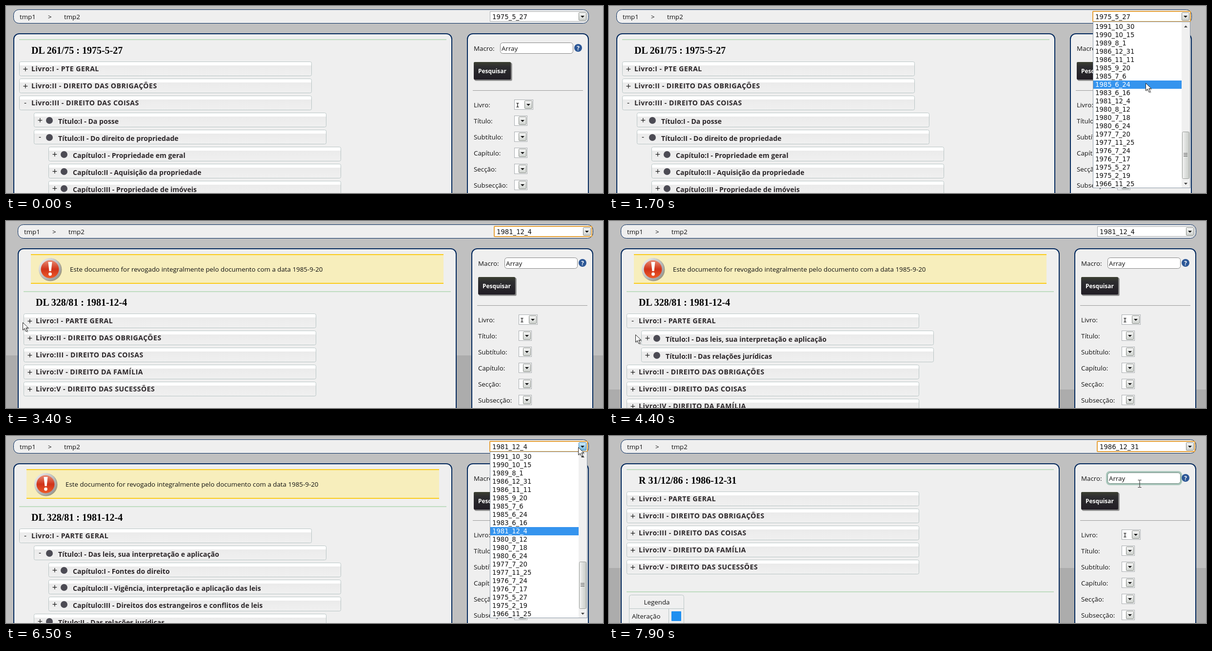
An HTML page for the animation above (8 s loop, 1224 px wide and 384 px high).

```html
<!DOCTYPE html>
<html lang="pt">
<head>
<meta charset="utf-8">
<style>
html, body { margin: 0; width: 100%; height: 100%; overflow: hidden; background: #c0c0c0; }
svg { display: block; }
text { font: 13.35px "Open Sans", "Noto Sans", sans-serif; fill: #111; white-space: pre; }
.date { font: 13.2px "DejaVu Sans", sans-serif; }
.mono { font: 13px "DejaVu Sans Mono", monospace; }
.sign { font: 14px "DejaVu Sans", sans-serif; }
.row { font-weight: 700; font-size: 14.1px; fill: #2b2629; }
.top { letter-spacing: .5px; }
.title { font: 700 20px "Liberation Serif", serif; fill: #000; }
.btn { font-weight: 700; font-size: 11.9px; fill: #fff; }
</style>
</head>
<body>
<svg width="1224" height="384">
  <defs>
    <linearGradient id="row" x2="0" y2="1">
      <stop offset=".25" stop-color="#fff"/><stop offset=".27" stop-color="#ebebeb"/><stop offset="1" stop-color="#f0f0f0"/>
    </linearGradient>
    <linearGradient id="grey" x2="0" y2="1">
      <stop offset="0" stop-color="#f6f6f6"/><stop offset="1" stop-color="#cfd3cf"/>
    </linearGradient>
    <linearGradient id="hot" x2="0" y2="1">
      <stop offset="0" stop-color="#d5effc"/><stop offset="1" stop-color="#6cb3dc"/>
    </linearGradient>
    <linearGradient id="thumb">
      <stop offset="0" stop-color="#f5f5f5"/><stop offset=".5" stop-color="#dcdedc"/><stop offset="1" stop-color="#c8ccc8"/>
    </linearGradient>
    <linearGradient id="dark" x2="0" y2="1">
      <stop offset="0" stop-color="#3c4032"/><stop offset=".25" stop-color="#2e2e30"/><stop offset="1" stop-color="#211d25"/>
    </linearGradient>
    <linearGradient id="ring" x2="1" y2="1">
      <stop offset="0" stop-color="#f4f4f4"/><stop offset="1" stop-color="#8c8c8c"/>
    </linearGradient>
    <linearGradient id="red" x2="0" y2="1">
      <stop offset="0" stop-color="#e88a72"/><stop offset=".5" stop-color="#d0331a"/><stop offset="1" stop-color="#ee5a28"/>
    </linearGradient>
  </defs>
  <g id="stage"></g>
</svg>
<script>
const LOOP = 8000, NAVY = '#02285c', LINE = '#b9c5c5', GREEN = '#bfdcc0';
const dates = ('1991_10_30 1990_10_15 1989_8_1 1986_12_31 1986_11_11 1985_9_20 1985_7_6 1985_6_24 1983_6_16 1981_12_4 ' +
  '1980_8_12 1980_7_18 1980_6_24 1977_7_20 1977_11_25 1976_7_24 1976_7_17 1975_5_27 1975_2_19 1966_11_25').split(' ');

// Each row: indent level, sign, label
const books = ['I - PARTE GERAL', 'II - DIREITO DAS OBRIGAÇÕES', 'III - DIREITO DAS COISAS',
  'IV - DIREITO DA FAMÍLIA', 'V - DIREITO DAS SUCESSÕES'].map(s => [0, '+', 'Livro:' + s]);
const chapters = [
  [2, '+', 'Capítulo:I - Fontes do direito'],
  [2, '+', 'Capítulo:II - Vigência, interpretação e aplicação das leis'],
  [2, '+', 'Capítulo:III - Direitos dos estrangeiros e conflitos de leis']];
const expanded = (sign, inner) => [
  [0, '-', books[0][2]],
  [1, sign, 'Título:I - Das leis, sua interpretação e aplicação'],
  ...inner,
  [1, '+', 'Título:II - Das relações jurídicas'],
  ...books.slice(1)];
const revoked = { title: 'DL 328/81 : 1981-12-4', notice: true };

// Page states by start time; floor is where the darker backdrop begins
const pages = [
  { at: 0, title: 'DL 261/75 : 1975-5-27', rows: [
    [0, '+', 'Livro:I - PTE GERAL'], books[1], [0, '-', books[2][2]],
    [1, '+', 'Título:I - Da posse'],
    [1, '-', 'Título:II - Do direito de propriedade'],
    [2, '+', 'Capítulo:I - Propriedade em geral'],
    [2, '+', 'Capítulo:II - Aquisição da propriedade'],
    [2, '+', 'Capítulo:III - Propriedade de imóveis']] },
  { at: 3000, ...revoked, rows: books, shift: 9, floor: 276 },
  { at: 3800, ...revoked, rows: expanded('+', []), shift: 9, floor: 346 },
  { at: 5200, ...revoked, rows: expanded('-', chapters) },
  { at: 7700, title: 'R 31/12/86 : 1986-12-31', rows: books, shift: 9, floor: 271, legend: true }];

// Pointer path: time, x, y
const path = [[300, 1212, 150], [700, 1182, 22], [1100, 1182, 22], [1200, 1166, 34], [2000, 1060, 232],
  [2500, 1043, 198], [3000, 1043, 198], [3400, 34, 208], [3700, 46, 204], [3800, 46, 204],
  [4600, 57, 243], [4900, 75, 234], [5200, 75, 234], [5500, 99, 238], [6000, 84, 240],
  [6400, 1180, 22], [6500, 1173, 23], [6900, 1095, 70], [7100, 1088, 98], [LOOP, 1088, 98]];

const rect = (x, y, w, h, fill, stroke, rx = 0, sw = 1) =>
  `<rect x="${x}" y="${y}" width="${w}" height="${h}" fill="${fill}" rx="${rx}"` +
  (stroke ? ` stroke="${stroke}" stroke-width="${sw}"/>` : '/>');
const text = (x, mid, s, cls = '', extra = '') =>
  `<text x="${x}" y="${mid + 5}" class="${cls}" ${extra}>${s}</text>`;
const dot = (x, y, r, fill) => `<circle cx="${x}" cy="${y}" r="${r}" fill="${fill}"/>`;
const shape = (d, fill, stroke = 'none') => `<path d="${d}" fill="${fill}" stroke="${stroke}"/>`;

function pointerAt(t) {
  const i = path.findIndex(k => k[0] > t);
  if (i < 1) return null;
  const [t0, x0, y0] = path[i - 1], [t1, x1, y1] = path[i], p = (t - t0) / (t1 - t0);
  return [x0 + (x1 - x0) * p, y0 + (y1 - y0) * p];
}

function select(x, y, w, hot) {
  const b = x + w - 18;
  return rect(x + .5, y + .5, w - 1, 20, '#fff', '#a9adb0') +
    rect(b + .5, y + 2.5, 15, 16, hot ? 'url(#hot)' : 'url(#grey)', hot ? '#3c7fb1' : '#858a85', 1) +
    shape(`M${b + 4} ${y + 9}h8l-4 4z`, '#111');
}

function row([level, sign, label], y) {
  const x = 27 + 30 * level;
  return rect(x + .5, y + .5, 599, 29, 'url(#row)', LINE, 3) +
    text(sign == '+' ? x + 7 : x + 10, y + 15, sign, 'sign') +
    (level ? dot(x + 32, y + 16, 7, '#4c4b54') + text(x + 50, y + 18, label, 'row')
           : text(x + 25, y + 15, label, 'row top'));
}

const notice = () =>
  rect(42, 68, 846, 61, '#f7eebc') + rect(42, 68, 846, 2, '#fbcb1a') + rect(42, 127, 846, 2, '#fbcb1a') +
  dot(82, 100, 23.5, '#9f9a80') + dot(81, 99, 23, 'url(#ring)') + dot(81, 99, 18.5, 'url(#red)') +
  shape('M77.5 84h8l-2 19h-4z', '#fff') + dot(81.5, 109, 3.4, '#fff') +
  text(122, 99, 'Este documento for revogado integralmente pelo documento com a data 1985-9-20');

const legend = () =>
  rect(27, 319, 876, 2, GREEN) + rect(32.5, 326.5, 112, 80, '#f0f0f0', LINE, 4) +
  rect(32, 354, 113, 1, LINE) + rect(113, 354, 1, 30, LINE) +
  text(89, 341, 'Legenda', '', 'text-anchor="middle"') + text(38, 370, 'Alteração') +
  rect(119, 360, 20, 20, '#1f8ff0', '', 1);

function sidebar(glow) {
  return rect(946, 57, 248, 400, '#efefef', NAVY, 11, 2) +
    text(959, 87, 'Macro:') +
    (glow ? rect(1012, 74, 152, 25, 'none', '#a9c6bb', 6, 4) : '') +
    rect(1013.5, 75.5, 149, 22, '#fff', glow ? '#6f8a80' : '#858585', 5) + text(1016, 87, 'Array') +
    dot(1173, 86, 8, '#2c5796') + text(1173, 85.5, '?', 'btn', 'text-anchor="middle"') +
    rect(961, 117, 77, 37, '#aaa', '', 3) + rect(960, 116, 77, 37, '#858585', '', 3) +
    rect(959, 115, 76, 36, 'url(#dark)', '', 2) + text(968, 133, 'Pesquisar', 'btn') +
    rect(957, 173, 226, 1, '#9a9a9a') +
    ['Livro', 'Título', 'Subtítulo', 'Capítulo', 'Secção', 'Subsecção'].map((s, i) =>
      text(959, 203 + 33 * i, s + ':') + select(1042, 192 + 33 * i, i ? 27 : 39)).join('') +
    text(1045, 203, 'I', 'mono');
}

function dropList(active) {
  return rect(992.5, 32.5, 199, 341, '#fff', '#8a97a5') +
    rect(993, 34 + 17 * active, 181, 17, '#3594ee') +
    dates.map((d, i) => text(997, 42 + 17 * i, d, 'date', i == active ? 'style="fill:#fff"' : '')).join('') +
    rect(1174, 33, 17, 340, '#f0f0f0') +
    shape('M1179 44h7l-3.5-4z M1179 363h7l-3.5 4z', '#444') +
    rect(1175.5, 258.5, 14, 96, 'url(#thumb)', '#979b97', 2) +
    [302, 305, 308].map(y => rect(1178, y, 8, 1, '#555')).join('');
}

function pointer([x, y], beam) {
  const d = beam ? shape('M-3.5 -7.5h3l.5 .5l.5 -.5h3M0 -7V7M-3.5 7.5h3l.5 -.5l.5 .5h3', 'none', '#222')
    : `<g opacity=".25" transform="translate(2 2)">${shape('M0 0V16l4-4 3 7 3-1-3-6h5z', '#000')}</g>` +
      shape('M.5 .5V16l3.7-3.6 2.8 6.6 2.7-1.1-2.8-6.4h5z', '#fff', '#222');
  return `<g transform="translate(${Math.round(x)} ${Math.round(y)})">${d}</g>`;
}

function draw(t) {
  const page = pages.findLast(p => p.at <= t);
  const open = t >= 800 && t < 2900 || t >= 6400 && t < 7600;
  const focus = t >= 800 && t < 3800 || t >= 6400;
  const value = t < 2900 ? '1975_5_27' : t < 7600 ? '1981_12_4' : '1986_12_31';
  const pos = pointerAt(t);
  const hot = pos && pos[0] > 1160 && pos[1] < 35;
  const active = pos && !hot && pos[0] < 1174 && pos[1] >= 34 ? Math.floor((pos[1] - 34) / 17) : dates.indexOf(value);
  const top = page.notice ? 144 : 68;

  return rect(0, 0, 1224, 384, '#c0c0c0') +
    (page.floor ? rect(0, page.floor, 1224, 384, '#acacac') : '') +
    `<g transform="translate(${page.shift || 0})">` +
    rect(15.5, 7.5, 1179, 28, '#efefef', NAVY, 11) +
    text(28, 22, 'tmp1') + text(86, 22, '&gt;') + text(119, 22, 'tmp2') +
    rect(16, 57, 898, 400, '#efefef', NAVY, 11, 2) +
    (page.notice ? notice() : '') +
    rect(27, top, 876, 2, GREEN) + text(52, top + 25, page.title, 'title') +
    page.rows.map((r, i) => row(r, top + 46 + 35 * i)).join('') +
    (page.legend ? legend() : '') +
    sidebar(page.legend) +
    select(992, 11, 200, hot) +
    (focus ? rect(992, 11, 200, 21, 'none', '#e5a23c', 1, 2) : '') +
    text(997, 22, value, 'date') +
    (open ? dropList(active) : '') + '</g>' +
    (pos ? pointer(pos, page.legend) : '');
}

const stage = document.getElementById('stage'), start = performance.now();
let last = -1;
function tick() {
  const t = Math.floor((performance.now() - start) % LOOP / 100) * 100;
  if (t != last) stage.innerHTML = draw(last = t);
  requestAnimationFrame(tick);
}
tick();
</script>
</body>
</html>
```
